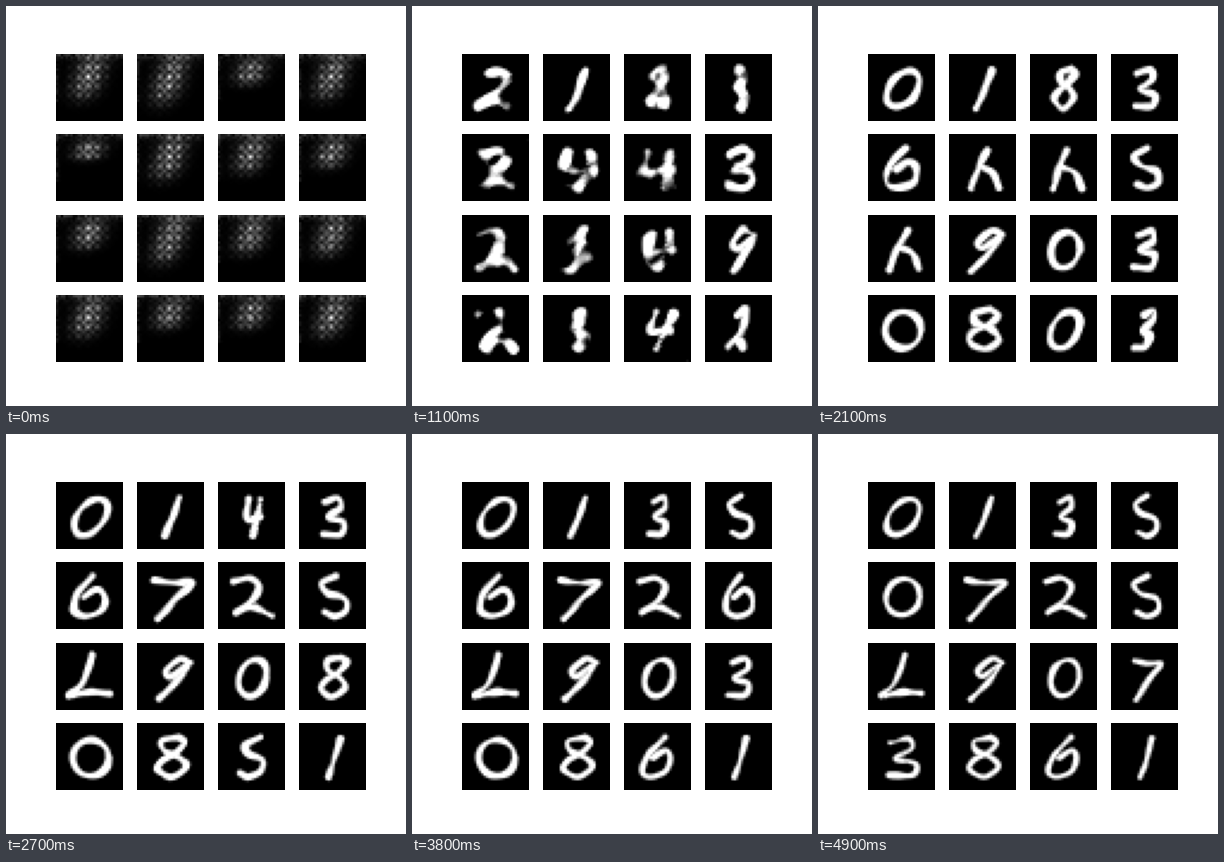
A matplotlib script that plays this animation: 400 px wide and 400 px high, repeating every 5 s.

```python
import numpy as np
import matplotlib.pyplot as plt
from matplotlib.animation import FuncAnimation

FRAMES, INTERVAL = 50, 100
SIZE, PITCH = 28, 67 / 28           # pixels per tile side, stage pixels per tile pixel
CHANGES = [7, 16, 21, 27, 38, 49]   # frames at which a tile reaches its next glyph
ROWS, COLS = np.mgrid[0:SIZE, 0:SIZE]
X, Y = (COLS + 0.5) * PITCH, (ROWS + 0.5) * PITCH
rng = np.random.default_rng(4)

turn = np.linspace(0, 2 * np.pi, 13)

# Strokes in a box from -1 to 1, y pointing down
GLYPHS = {
    "0": [np.column_stack([np.cos(turn), 0.95 * np.sin(turn)])],
    "1": [[(0, -1), (0.1, 0), (0, 1)]],
    "2": [[(-1, -.8), (-.2, -1), (.3, -.6), (0, .1), (-.9, .85), (-.1, .5), (1, 1)]],
    "3": [[(-.7, -.8), (.3, -1), (.5, -.5), (-.4, 0), (.7, .3), (.5, .9), (-.8, .9)]],
    "4": [[(-.6, -.9), (-.6, .1), (.7, 0)], [(.6, -.9), (.2, 1)]],
    "5": [[(.1, -1.1), (-.8, -.7), (-.4, -.2), (.7, .1), (.8, .7), (.1, 1), (-.6, .8)]],
    "6": [[(0, -1.1), (-.8, -.2), (-.9, .7), (-.2, 1), (.7, .7), (.8, 0), (.3, -.4), (-.4, 0)]],
    "7": [[(-1, -.9), (0, -.75), (1, -.75), (.3, 0), (-.6, 1.15)]],
    "8": [[(.4, -1.1), (-.6, -.9), (-.5, -.4), (.5, 0), (.9, .5), (0, 1), (-.9, .6),
           (-.6, .1), (.3, -.3), (.8, -.8), (.4, -1.1)]],
    "9": [[(.9, -.8), (.1, -1), (-.6, -.4), (-.1, -.1), (.8, -.7), (.4, .2), (-.4, 1.1)]],
    "A": [[(.1, -1), (-.2, -.3), (-.6, 1)], [(-.1, -.1), (.5, .2), (.9, 1)]],
    "L": [[(0, -1.2), (-.2, -.4), (-.5, .4), (-1, .9)], [(-.8, .9), (0, .75), (1, .8)]],
}

# Glyph at each change, slant, half width, depth of the first glow
TILES = [
    ("270000", .4, 15, 22), ("111111", .4, 8, 25), ("288433", .1, 10, 13), ("133355", 0, 13, 22),
    ("296660", .1, 17, 10), ("40A777", .1, 19, 22), ("4AA222", 0, 19, 18), ("385565", 0, 15, 15),
    ("2AALLL", .1, 20, 15), ("169999", .35, 14, 24), ("400000", .15, 14, 18), ("993837", .1, 13, 19),
    ("2A0003", 0, 18, 20), ("138888", 0, 16, 15), ("440566", .3, 14, 15), ("223111", .3, 8, 20),
]


def curve(points, steps=10):
    """Catmull-Rom curve through the points."""
    pts = np.asarray(points, float)
    p = np.vstack([2 * pts[0] - pts[1], pts, 2 * pts[-1] - pts[-2]])
    u = np.linspace(0, 1, steps)[:, None]
    return np.vstack([
        0.5 * (2 * b + (c - a) * u + (2 * a - 5 * b + 4 * c - d) * u ** 2
               + (3 * b - a - 3 * c + d) * u ** 3)
        for a, b, c, d in zip(p, p[1:], p[2:], p[3:])])


def distance(glyph, slant, width, height=19, limit=9):
    """Distance in stage pixels from each tile pixel to the glyph."""
    path = np.vstack([curve(stroke) for stroke in GLYPHS[glyph]])
    px = 35 + width * path[:, 0] - slant * height * path[:, 1]
    py = 35 + height * path[:, 1]
    gap = np.hypot(X[..., None] - px, Y[..., None] - py).min(axis=2)
    return np.minimum(gap, limit)


def lattice(depth):
    """Dotted glow hanging from the top, narrowing towards the lower left."""
    def dots(shift):
        return ((0.5 + 0.5 * np.cos(np.pi / 2 * (COLS - 1 - shift)))
                * (0.5 + 0.5 * np.cos(np.pi / 2 * (ROWS - 1 - shift))))
    cy = 11 + depth / 2
    glow = np.exp(-((X - 33 + 0.3 * (Y - cy)) / 14) ** 2 - np.abs((Y - cy) / depth) ** 3)
    image = glow * (0.12 + 0.85 * dots(0) + 0.4 * dots(2)) * rng.uniform(0.6, 1.1, glow.shape)
    edge = 0.25 * np.exp(-ROWS / 1.4) + 0.12 * np.exp(-COLS / 0.6) * (ROWS < 20)
    return np.clip(image + edge * rng.uniform(0, 1, glow.shape), 0, 1)


class Tile:
    def __init__(self, glyphs, slant, width, depth):
        self.start = lattice(depth)
        self.fields = [distance(glyph, slant, width) for glyph in glyphs]
        angle, self.phase = rng.uniform(0, 2 * np.pi, (2, 8))
        pace = rng.uniform(0.12, 0.35, 8)
        self.kx, self.ky = pace * np.cos(angle), pace * np.sin(angle)

    def noise(self, frame):
        """Smooth noise that drifts from frame to frame."""
        waves = np.sin(X[..., None] * self.kx + Y[..., None] * self.ky
                       + self.phase + 0.5 * frame)
        return waves.sum(axis=2) / 2.8

    def image(self, frame):
        place = np.interp(frame, CHANGES, range(len(CHANGES)))
        index = min(int(place), len(CHANGES) - 2)
        u = place - index
        u = u * u * (3 - 2 * u)
        before, after = self.fields[index:index + 2]

        # Keep the amount of ink steady while one glyph flows into the next
        radius = 3.9 - 1.1 * frame / FRAMES
        ink = (1 - u) * np.mean(before < radius) + u * np.mean(after < radius)
        field = (1 - u) * before + u * after
        field = field + (0.6 + 4 * np.exp(-frame / 8)) * self.noise(frame)
        shape = np.clip((np.quantile(field, ink) - field) / 2.6 + 0.5, 0, 1)

        fade = min(frame / 4, 1)
        return (1 - fade) * self.start + fade * shape


fig, axes = plt.subplots(4, 4, figsize=(4, 4), dpi=100)
fig.subplots_adjust(left=0.125, right=0.9, bottom=0.11, top=0.88, wspace=0.2, hspace=0.2)
tiles = [Tile(*row) for row in TILES]
pictures = []
for ax, tile in zip(axes.flat, tiles):
    ax.axis("off")
    pictures.append(ax.imshow(tile.start, cmap="gray", vmin=0, vmax=1))


def update(frame):
    for picture, tile in zip(pictures, tiles):
        picture.set_data(tile.image(frame))
    return pictures


animation = FuncAnimation(fig, update, frames=FRAMES, interval=INTERVAL,
                          repeat=True, repeat_delay=0)
plt.show()
```
